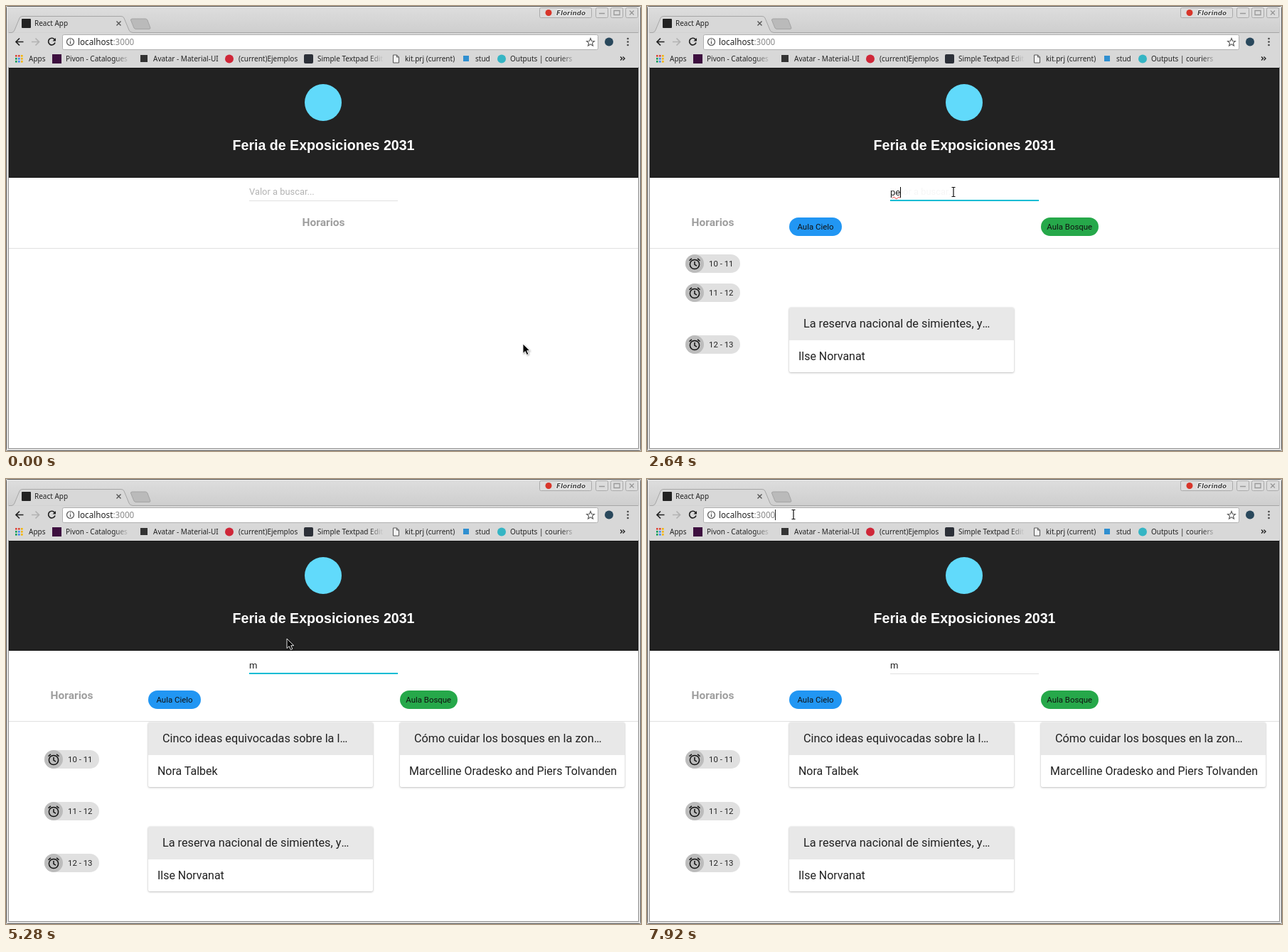
An HTML page for the animation above (8 s loop, 893 by 627 pixels).

```html
<!DOCTYPE html>
<html lang="es">
<head>
<meta charset="utf-8">
<title>React App</title>
<style>
html, body { margin: 0; width: 100%; height: 100%; overflow: hidden; background: #d6d6d6; }
#stage { position: relative; width: 893px; height: 627px; overflow: hidden; font-family: Roboto, sans-serif; }
#stage > svg { position: absolute; left: 0; top: 0; }
.ui text { font: 10px "Noto Sans", sans-serif; fill: #222; }
.ui .url { font-size: 11.7px; }
#page { position: absolute; inset: 0; background: #fff; clip-path: inset(87px 4px 4px 4px); --shift: 0px; --time: 54px; --a: 200px; --b: 554px; --card: 316px; --title: 264px; }
#page.narrow { --shift: -6px; --time: 52px; --a: 197.5px; --b: 546.5px; --card: 311px; --title: 259px; }
#page div { position: absolute; white-space: nowrap; box-sizing: border-box; }
#page .head { left: 4px; top: 87px; width: 885px; height: 155px; background: #222; border: 1px solid #121212; }
#middle { left: 0; top: 0; width: 893px; transform: translateX(var(--shift)); }
#middle .logo { left: 420px; top: 110px; width: 52px; height: 52px; border-radius: 50%; background: #61dafb; }
#middle .name { left: 0; width: 893px; top: 182px; text-align: center; color: #fff; font: bold 19.6px/28px "Liberation Sans", Arial, sans-serif; }
#hint, #value { left: 342px; line-height: 20px; }
#hint { top: 251.5px; font-size: 12.9px; color: #b3b3b3; }
#value { top: 252.5px; font-size: 13.06px; color: #222; }
#value.odd #typed { text-decoration: underline wavy #e33 1px; text-underline-offset: 1px; }
#caret { display: inline-block; width: 1px; height: 15px; background: #000; vertical-align: -3px; margin-right: -1px; }
#middle .rule { left: 342px; top: 274px; width: 209px; height: 1px; background: #e0e0e0; }
#focus { left: 342px; top: 273px; width: 209px; height: 2px; background: #00bcd4; }
#hours { top: 295px; width: 120px; text-align: center; color: #9e9e9e; font: bold 15.5px/20px Roboto, sans-serif; }
#page .divider { left: 4px; top: 341px; width: 885px; height: 1px; background: #e0e0e0; }
#page .room { top: 298px; height: 26px; border-radius: 13px; text-align: center; font-size: 11.43px; line-height: 26px; color: #111; }
#page .row { position: relative; height: 41px; }
#page .row.full { height: 105.5px; }
#list { left: 0; top: 342px; width: 893px; }
#page .slot { left: var(--time); top: 50%; margin-top: -13px; width: 77px; height: 26px; border-radius: 13px; background: #e0e0e0; font-size: 11.43px; line-height: 26px; padding-left: 33px; color: #222; }
.slot svg { position: absolute; left: 0; top: 0; }
#page .card { top: 1px; width: var(--card); height: 91px; border-radius: 2px; background: #fff; box-shadow: 0 1px 3px rgba(0,0,0,.22), 0 0 2px rgba(0,0,0,.14); color: #212121; }
#page .card.a { left: var(--a); }
#page .card.b { left: var(--b); }
#page .card .bar { left: 0; top: 0; width: 100%; height: 46px; background: #e8e8e8; border-radius: 2px 2px 0 0; }
#page .card .title { left: 20px; top: 0; width: var(--title); line-height: 46px; font-size: 16.25px; overflow: hidden; text-overflow: ellipsis; }
#page .card .who { left: 13px; top: 46px; line-height: 45px; font-size: 15.95px; }
#scroll { left: 877px; top: 87px; width: 12px; height: 536px; background: #f1f1f1; }
#scroll .thumb { left: 2px; top: 11px; width: 9px; height: 480px; background: #c1c1c1; }
#scroll svg { position: absolute; left: 0; top: 0; }
</style>
</head>
<body>
<div id="stage">
  <svg class="ui" width="893" height="627">
    <defs>
      <linearGradient id="strip" x2="0" y2="1"><stop stop-color="#dedede"/><stop offset="1" stop-color="#cecece"/></linearGradient>
      <linearGradient id="fade"><stop stop-color="#d8d8d8" stop-opacity="0"/><stop offset="1" stop-color="#d8d8d8"/></linearGradient>
    </defs>
    <rect width="893" height="627" fill="#d8d8d8"/>
    <rect width="893" height="38" fill="url(#strip)"/>
    <path d="M4 37.5H8Q11 37 12 34L19 17Q20 14.500 23 14.500H162Q165 14.500 166 17L173 34Q174 37 178 37.500H889" fill="#d8d8d8" stroke="#a6a6a6"/>
    <path d="M5 38.500H888" stroke="#d8d8d8"/>
    <path d="M178 18H196Q198 18 199 20L203 31Q203 32.500 201 32.500H183Q181 32.500 180 31L175.500 20Q175 18 178 18Z" fill="#bababa" stroke="#a4a4a4"/>
    <rect x="22" y="18" width="13" height="13" rx="1" fill="#222"/>
    <text x="40" y="28">React App</text>
    <path d="M155.500 21.500l6 6m0-6l-6 6" stroke="#555" stroke-width="1.400"/>

    <g fill="#dcdcdc" stroke="#aaa">
      <rect x="750.500" y="2.500" width="73" height="14" rx="2"/>
      <rect x="829.500" y="2.500" width="17" height="14" rx="2"/>
      <rect x="850.500" y="2.500" width="17" height="14" rx="2"/>
      <rect x="871.500" y="2.500" width="17" height="14" rx="2"/>
    </g>
    <path d="M834 10.500h8M855 6.500h8v6h-8zM877 6.500l6 6m0-6l-6 6" fill="none" stroke="#999" stroke-width="1.300"/>
    <circle cx="763" cy="9.500" r="4.500" fill="#d8352a"/>
    <text x="774" y="13" style="font:italic bold 8.800px 'DejaVu Sans',sans-serif;fill:#444;stroke:#fff;stroke-width:1.500;paint-order:stroke">Florindo</text>

    <g fill="none" stroke-width="1.700">
      <path d="M24.500 50.500H14m5-5l-5 5 5 5" stroke="#222"/>
      <path d="M36 50.500h10.500m-5-5l5 5-5 5" stroke="#b2b2b2"/>
      <path d="M68.500 47.500a4.800 4.800 0 1 0 .5 4" stroke="#222"/>
    </g>
    <path d="M70 45v4.500h-4.500z" fill="#222"/>
    <rect x="79.500" y="40.500" width="753" height="21" rx="2" fill="#fff" stroke="#b0b0b0"/>
    <circle cx="90.500" cy="50.500" r="5" fill="none" stroke="#555" stroke-width="1.200"/>
    <path d="M90.500 49.500v4M90.500 47v1.300" stroke="#555" stroke-width="1.300"/>
    <rect id="mark" x="101" y="43" width="80" height="16" fill="#4a90d9"/>
    <text class="url" x="101" y="55" id="url">localhost<tspan id="port" fill="#888">:3000</tspan></text>
    <path id="urlCaret" d="M180.500 43v15" stroke="#222"/>
    <path d="M822 45.500l1.500 3.700 4 .3-3 2.600 1 3.900-3.500-2.100-3.500 2.100 1-3.900-3-2.600 4-.3z" fill="none" stroke="#555" stroke-width="1.100"/>
    <circle cx="848" cy="50.500" r="6" fill="#29485c"/>
    <g fill="#444"><circle cx="874.500" cy="46" r="1.300"/><circle cx="874.500" cy="50.500" r="1.300"/><circle cx="874.500" cy="55" r="1.300"/></g>

    <g id="dots"></g>
    <text x="32" y="78">Apps</text>
    <rect x="65" y="68" width="13" height="13" fill="#3d0f3f"/>
    <text x="84" y="78">Pivon - Catalogues</text>
    <rect x="189" y="69" width="10" height="10" fill="#333"/>
    <text x="207" y="78">Avatar - Material-UI</text>
    <circle cx="314" cy="74.500" r="6" fill="#cf2638"/>
    <text x="327" y="78">(current)Ejemplos</text>
    <rect x="419" y="68" width="13" height="13" rx="2" fill="#2c3038"/>
    <text x="438" y="78">Simple Textpad Editor</text>
    <path d="M544.500 69h5l3 3v8h-8zM549.500 69v3h3" fill="#f4f4f4" stroke="#555"/>
    <text x="561" y="78">kit.prj (current)</text>
    <rect x="643" y="70" width="8" height="8" fill="#2f8fd0"/>
    <text x="660" y="78">stud</text>
    <circle cx="697" cy="74.500" r="6" fill="#35b5c4"/>
    <text x="709" y="78">Outputs | couriers</text>
    <g id="fades"></g>
    <path d="M864 71.500l2.500 2.500-2.500 2.500m3.500-5l2.500 2.500-2.500 2.500" fill="none" stroke="#222" stroke-width="1.400"/>
    <path d="M3.500 86V623.500H889.500V86" fill="none" stroke="#999"/>
    <rect x=".5" y=".5" width="892" height="626" rx="2" fill="none" stroke="#555"/>
    <rect x="1.500" y="1.500" width="890" height="624" fill="none" stroke="#eee"/>
  </svg>

  <div id="page">
    <div class="head"></div>
    <div id="middle">
      <div class="logo"></div>
      <div class="name">Feria de Exposiciones 2031</div>
      <div id="hint">Valor a buscar...</div>
      <div id="value"><span id="typed"></span><span id="caret"></span></div>
      <div class="rule"></div>
      <div id="focus"></div>
    </div>
    <div id="hours">Horarios</div>
    <div class="room" style="left:var(--a);width:74px;background:#2196f3">Aula Cielo</div>
    <div class="room" style="left:var(--b);width:80.500px;background:#26a84a">Aula Bosque</div>
    <div id="list"></div>
    <div class="divider"></div>
    <div id="scroll">
      <div class="thumb"></div>
      <svg width="12" height="536"><path d="M3 8l3-3.500 3 3.500z" fill="#a3a3a3"/><path d="M3 528l3 3.500 3-3.500z" fill="#505050"/></svg>
    </div>
  </div>

  <svg width="893" height="627">
    <g id="pointer">
      <path id="arrow" d="M0 0V13.500L3.200 10.600 5.400 15.500 7.800 14.400 5.700 9.700H9.800Z" fill="#000" stroke="#fff" stroke-width=".9" style="filter:drop-shadow(1px 1px 1px rgba(0,0,0,.35))"/>
      <g id="beam" fill="none">
        <path d="M-3-6.500H3M0-6.500V6.500M-3 6.500H3" stroke="#fff" stroke-width="2.600"/>
        <path d="M-2.500-6.500H2.500M0-6.500V6.500M-2.500 6.500H2.500" stroke="#111" stroke-width="1.200"/>
      </g>
    </g>
  </svg>
</div>
<script>
const $ = id => document.getElementById(id);
const LOOP = 8000, STEP = 120, FADE = 450;
const FOCUS = 1457, BLUR = 6610, SELECT = 6700, DESELECT = 7300;

const talks = [
  ["10 - 11", ["Cinco ideas equivocadas sobre la lluvia", "Nora Talbek"],
    ["Cómo cuidar los bosques en la zona alta", "Marcelline Oradesko and Piers Tolvanden"]],
  ["11 - 12", ["¿Por qué las abejas del campo no duermen?", "Bruno Vel"],
    ["La belleza y la paciencia de los tejedores", "Olna Varrenge"]],
  ["12 - 13", ["La reserva nacional de simientes, y su valle", "Ilse Norvanat"], null]
];

// Each row lists the columns that match the typed value.
const states = [
  { at: 0, text: "", rows: null },
  { at: 2480, text: "p", rows: ["ab", "a", "a"], narrow: true },
  { at: 2600, text: "pe", rows: ["", "", "a"] },
  { at: 3470, text: "p", rows: ["ab", "a", "a"], narrow: true },
  { at: 3590, text: "", rows: ["ab", "ab", "a"], narrow: true },
  { at: 4310, text: "m", rows: ["ab", "", "a"] }
];

// time, x, y
const path = [
  [0, 727, 476], [120, 690, 500], [240, 560, 540], [360, 380, 546], [480, 200, 480],
  [600, 118, 390], [720, 210, 310], [840, 370, 282], [1080, 428, 276], [1320, 431, 268],
  [1680, 431, 268], [1920, 431, 262], [5100, 431, 262], [5280, 395, 225], [5400, 310, 150],
  [5520, 210, 85], [5640, 130, 45], [5760, 94, 26], [5880, 96, 25], [6000, 130, 20],
  [6120, 172, 34], [6360, 200, 46], [6600, 206, 50]
];

const alarm = `<svg width="26" height="26"><circle cx="13" cy="13" r="13" fill="#bcbcbc"/>
  <g fill="none" stroke="#111" stroke-width="1.500"><circle cx="13" cy="14" r="6.600"/>
  <path d="M13 10v4.300l3 1.800M5.500 8.800l3.400-2.900M20.500 8.800l-3.400-2.900"/></g></svg>`;
const card = (talk, col) => talk ? `<div class="card ${col}"><div class="bar"></div>
  <div class="title">${talk[0]}</div><div class="who">${talk[1]}</div></div>` : "";
$("list").innerHTML = talks.map(([slot, a, b]) =>
  `<div class="row"><div class="slot">${alarm}${slot}</div>${card(a, "a")}${card(b, "b")}</div>`).join("");

const dotColors = ["#db4437", "#db4437", "#f4b400", "#0f9d58", "#4285f4", "#f4b400", "#0f9d58", "#4285f4", "#f4b400"];
$("dots").innerHTML = dotColors.map((c, i) =>
  `<rect x="${13 + i % 3 * 4}" y="${69 + Math.floor(i / 3) * 4}" width="2.600" height="2.600" fill="${c}"/>`).join("");
$("fades").innerHTML = [174, 531, 802].map(x =>
  `<rect x="${x - 22}" y="66" width="22" height="18" fill="url(#fade)"/><rect x="${x}" y="66" width="11" height="18" fill="#d8d8d8"/>`).join("");

const ease = ms => 1 - (1 - Math.min(1, Math.max(0, ms / FADE))) ** 5;
const show = (el, on) => { el.style.display = on ? "" : "none"; };
const rowEls = [...document.querySelectorAll(".row")];
const roomEls = [...document.querySelectorAll(".room")];

function pointAt(t) {
  const i = path.findIndex(p => p[0] > t);
  if (i < 0) return path[path.length - 1].slice(1);
  const [t0, x0, y0] = path[i - 1], [t1, x1, y1] = path[i];
  const u = (t - t0) / (t1 - t0);
  return [x0 + (x1 - x0) * u, y0 + (y1 - y0) * u];
}

function hintOpacity(t, now) {
  if (now.at === 0) return 1;
  if (!now.text) return ease(t - now.at);
  const typedAt = now.at < 3590 ? 2480 : 4310;
  return 1 - ease(t - typedAt);
}

function drawPage(t) {
  const now = states.filter(s => s.at <= t).pop();
  $("page").classList.toggle("narrow", !!now.narrow);
  show($("scroll"), now.narrow);
  show($("list"), now.rows);
  roomEls.forEach(el => show(el, now.rows));
  $("hours").style.left = (now.rows ? (now.narrow ? 31 : 32.5) : 386.5) + "px";
  if (now.rows) rowEls.forEach((row, i) => {
    row.classList.toggle("full", now.rows[i] !== "");
    for (const el of row.querySelectorAll(".card")) show(el, now.rows[i].includes(el.classList[1]));
  });
  $("typed").textContent = now.text;
  $("value").classList.toggle("odd", now.text === "pe");
  $("hint").style.opacity = hintOpacity(t, now);
  const blinkFrom = Math.max(FOCUS, now.at);
  const lit = Math.floor((t - blinkFrom) / 500) % 2 === 0;
  show($("caret"), t >= FOCUS && t < BLUR && lit);
  $("focus").style.transform = `scaleX(${t < BLUR ? ease(t - FOCUS) : 1 - ease(t - BLUR)})`;
}

function drawAddress(t) {
  const selected = t >= SELECT && t < DESELECT;
  show($("mark"), selected);
  $("url").style.fill = selected ? "#fff" : "#222";
  $("port").style.fill = selected ? "#fff" : "#888";
  show($("urlCaret"), t >= DESELECT);
}

function drawPointer(t) {
  const [x, y] = pointAt(t);
  const overInput = x > 336 && x < 551 && y > 246 && y < 276;
  const overAddress = x > 98 && y > 41 && y < 61;
  const text = overInput || overAddress;
  show($("beam"), text);
  show($("arrow"), !text);
  $("pointer").setAttribute("transform", `translate(${x} ${y})`);
}

function frame() {
  const t = Math.floor(performance.now() % LOOP / STEP) * STEP;
  drawPage(t);
  drawAddress(t);
  drawPointer(t);
  requestAnimationFrame(frame);
}
frame();
</script>
</body>
</html>
```
